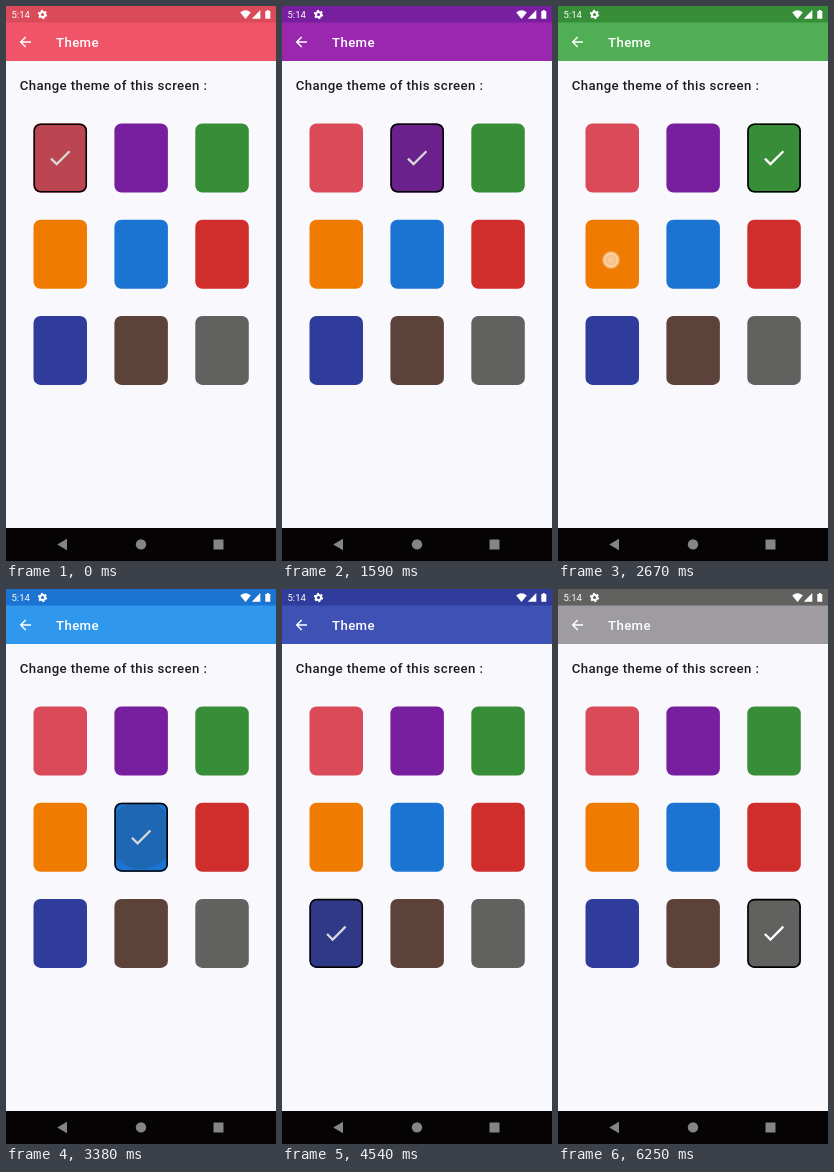
These frames come from a looping animation (270 px wide and 555 px high, 6500 ms). An HTML page:

```html
<!DOCTYPE html>
<html lang="en">
<head>
<meta charset="utf-8">
<title>Theme picker</title>
<style>
  html, body { margin: 0; width: 100%; height: 100%; overflow: hidden; background: #f8f8fd; }
  svg { display: block; width: 100%; height: 100%; }
  text { font-family: Roboto, sans-serif; }
  .label { font-size: 13.2px; font-weight: 500; letter-spacing: .4px; }
</style>
</head>
<body>
<svg id="stage" viewBox="0 0 270 555">
  <defs>
    <radialGradient id="glow">
      <stop offset="0" stop-color="#fff" stop-opacity=".72"/>
      <stop offset=".55" stop-color="#fff" stop-opacity=".62"/>
      <stop offset=".68" stop-color="#fff" stop-opacity=".85"/>
      <stop offset="1" stop-color="#fff" stop-opacity="0"/>
    </radialGradient>
    <clipPath id="clip"><rect id="clipBox" width="51.5" height="67" rx="6"/></clipPath>
  </defs>
  <rect width="270" height="555" fill="#f8f8fd"/>
  <rect id="appBar" y="16" width="270" height="39"/>
  <rect id="statusBar" width="270" height="16.5"/>

  <g fill="#fff">
    <text x="5.5" y="12" font-size="9.5">5:14</text>
    <circle cx="36.5" cy="8.5" r="2.6" fill="none" stroke="#fff" stroke-width="2"/>
    <circle cx="36.5" cy="8.5" r="3.9" fill="none" stroke="#fff" stroke-width="1.5" stroke-dasharray="2.04"/>
    <path d="M234.2 6.4Q239.5 2 244.8 6.4L239.5 13z"/>
    <path d="M254.3 4V12.7H245.8z"/>
    <path d="M259.3 5H260.8V4H262.8V5H264.3V12.8H259.3z"/>
    <path d="M25 36H15M19.7 31L14.7 36L19.7 41" fill="none" stroke="#fff" stroke-width="1.4"/>
    <text class="label" x="50" y="41">Theme</text>
  </g>
  <text class="label" x="13.7" y="83.5" fill="#1c1c20">Change theme of this screen :</text>

  <g id="tiles"></g>
  <g id="mark">
    <rect id="border" width="52" height="67.5" rx="6.5" fill="none" stroke="#000" stroke-width="1.6"/>
    <path id="check" d="M9 16.17L4.83 12l-1.42 1.41L9 19 21 7l-1.41-1.41z" fill="#fff"/>
  </g>
  <circle id="ripple" fill="#2d2d2d" clip-path="url(#clip)"/>
  <circle id="finger" r="9.5" fill="url(#glow)"/>

  <rect y="522" width="270" height="33" fill="#050304"/>
  <g fill="#858585">
    <path d="M51.2 538.5L61 532.7V544.3z"/>
    <circle cx="135" cy="538.4" r="5.2"/>
    <rect x="207.5" y="533.5" width="10" height="10" rx=".6"/>
  </g>
</svg>
<script>
const LOOP = 6500;
const $ = id => document.getElementById(id);
const set = (el, attrs) => { for (const k in attrs) el.setAttribute(k, attrs[k]); };
const clamp = v => Math.max(0, Math.min(1, v));

// [tile and status bar, app bar]
const themes = [
  ['#da4a59', '#f05469'], ['#781fa0', '#9a28ae'], ['#388e38', '#50af54'],
  ['#ef7c00', '#ff9800'], ['#1b74d2', '#2f98ec'], ['#cf2e2c', '#f04438'],
  ['#303c9c', '#3f51b5'], ['#5c4238', '#775a4e'], ['#616160', '#9e9ca0']
];
// When each theme gets selected, in grid order
const picks = [-150, 1430, 1960, 2740, 3290, 3920, 4400, 4720, 5580];
const PRESS = 90;
const missedTap = { from: 5060, to: 5170, x: 189, y: 343 };

const place = i => ({ x: 27.5 + i % 3 * 80.9, y: 117.5 + Math.floor(i / 3) * 96.2 });
const touchPoint = i => {
  const { x, y } = place(i);
  return i === 3 ? { x: x + 25.5, y: y + 40.3 } : { x: x + 26.7, y: y + 32.5 };
};

$('tiles').innerHTML = themes.map(([color], i) => {
  const { x, y } = place(i);
  return `<rect x="${x}" y="${y}" width="53.5" height="69" rx="7" fill="${color}"/>`;
}).join('');

function draw(t) {
  const selected = picks.findLastIndex(p => p <= t);
  const touched = picks.findLastIndex(p => p - PRESS <= t);
  const [dark, light] = themes[selected];
  set($('statusBar'), { fill: dark });
  set($('appBar'), { fill: light });

  const { x, y } = place(selected);
  set($('border'), { x: x + .75, y: y + .75 });
  set($('check'), { transform: `translate(${x + 12.9} ${y + 20.6}) scale(1.14)` });

  // Ripple spreads from the press, then fades after the release
  const age = t - picks[touched];
  const box = place(touched), point = touchPoint(touched);
  set($('clipBox'), { x: box.x + 1, y: box.y + 1 });
  set($('ripple'), {
    cx: point.x, cy: point.y,
    r: 14 + 32 * clamp((age + PRESS) / 290),
    opacity: .18 * clamp((age + 60) / 60) * clamp((360 - age) / 160)
  });

  const missed = t >= missedTap.from && t < missedTap.to;
  const at = missed ? missedTap : point;
  set($('finger'), { cx: at.x, cy: at.y, opacity: missed || age < 0 ? .85 : 0 });
}

const start = performance.now();
function tick() {
  draw((performance.now() - start) % LOOP);
  requestAnimationFrame(tick);
}
tick();
</script>
</body>
</html>
```
